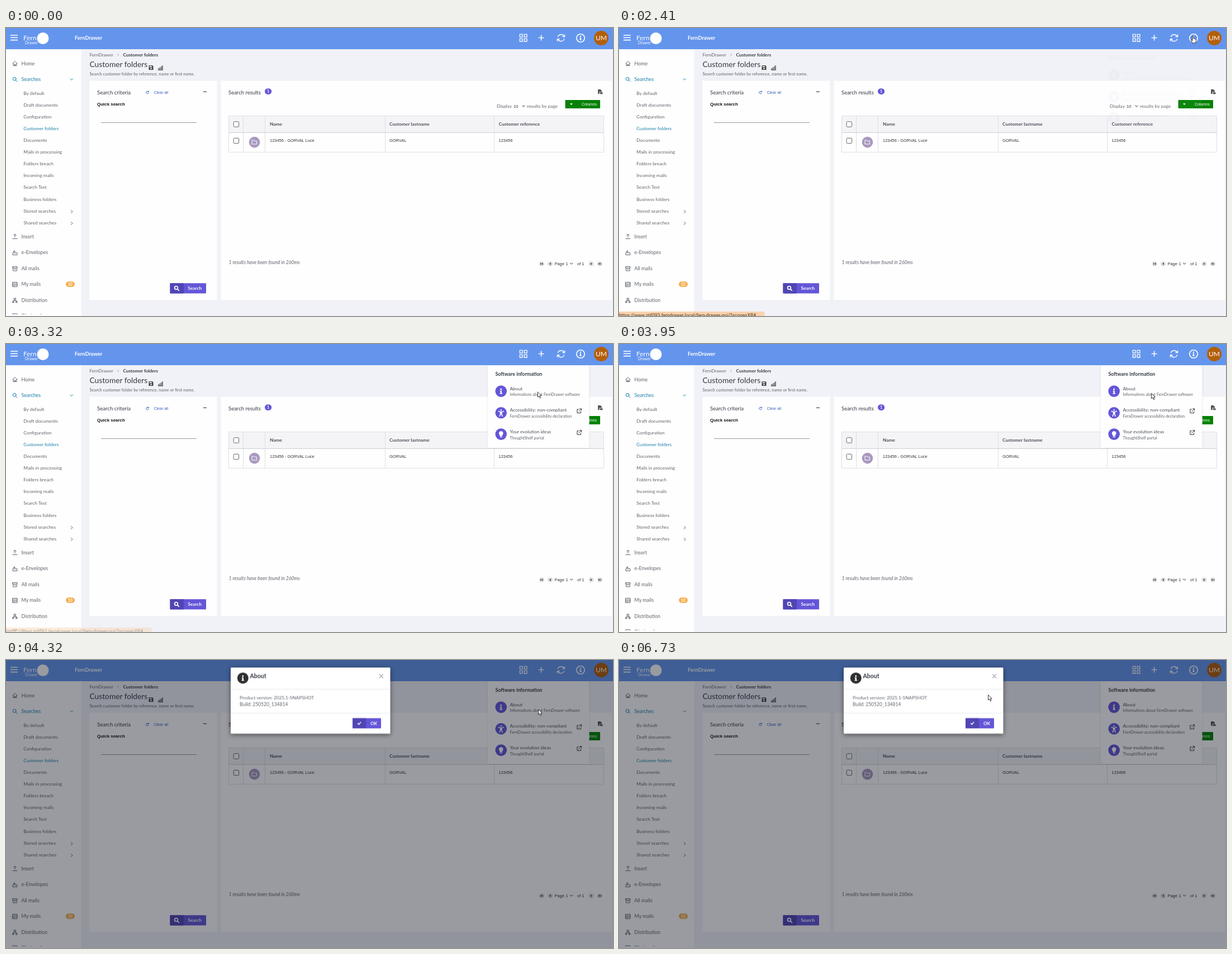
An HTML page that plays this animation: 1086x516 px, repeating every 8.05 s.

```html
<!DOCTYPE html>
<html lang="en">
<head>
<meta charset="utf-8">
<title>Customer folders</title>
<style>
  html, body { margin: 0; width: 100%; height: 100%; overflow: hidden; background: #f1f2f7; }
  svg { display: block; }
  text { font-family: Lato, "Open Sans", sans-serif; fill: #5f646c; white-space: pre; }
  .arial { font-family: "Liberation Sans", Arial, sans-serif; font-size: 7.45px; fill: #333; }
  .b { font-weight: 700; }
  .dark { fill: #343a44; }
  .white { fill: #fff; }
  .line { fill: none; stroke: #5f646c; stroke-width: 1; stroke-linecap: round; stroke-linejoin: round; }
  .bar { stroke: #fff; stroke-width: 1.6; }
  .on { fill: #1a7fa8; }
  .line.on { fill: none; stroke: #1a7fa8; }
  .main { font-size: 8.9px; }
  .sub { font-size: 8.35px; }
  .head { font-size: 8.4px; font-weight: 700; fill: #4a4f58; }
  .item { font-size: 8.3px; fill: #4a4f58; }
  .note { font-size: 7px; }
  .purple { fill: #6456d8; }
  .deep { fill: #5145b4; }

  .tip, .menu, .hover, .veil, .modal, .pointer, .arrow, .hand {
    animation: 8050ms linear infinite;
  }
  .tip { animation-name: tip; }
  .menu { animation-name: menu; filter: drop-shadow(0 0 1px rgba(50, 58, 70, .18)); }
  .hover { animation-name: hover; }
  .veil { animation-name: veil; }
  .modal { animation-name: modal; }
  .pointer { animation-name: pointer; }
  .arrow { animation-name: arrow; }
  .hand { animation-name: hand; }
  .sheet { filter: drop-shadow(0 2px 4px rgba(0, 0, 0, .5)); }

  @keyframes tip {
    0%, 19.5% { opacity: 0; }
    20.7%, 40% { opacity: 1; }
    42.2%, 100% { opacity: 0; }
  }
  @keyframes menu {
    0%, 29.9% { opacity: 0; }
    31.5%, 100% { opacity: 1; }
  }
  @keyframes hover {
    0%, 29.9% { opacity: 0; }
    31%, 38% { opacity: 1; }
    39.1%, 100% { opacity: 0; }
  }
  @keyframes veil {
    0%, 49.99% { opacity: 0; }
    50%, 100% { opacity: 1; }
  }
  @keyframes modal {
    0%, 49.99% { opacity: 0; transform: translateY(-24.5px); }
    50% { opacity: 1; transform: translateY(-24.5px); }
    50.8% { opacity: 1; transform: translateY(-24.5px); animation-timing-function: ease-out; }
    53.6%, 100% { opacity: 1; transform: none; }
  }
  @keyframes arrow {
    0%, 5.04% { opacity: 0; }
    5.05%, 16.1% { opacity: 1; }
    16.11%, 39% { opacity: 0; }
    39.01%, 100% { opacity: 1; }
  }
  @keyframes hand {
    0%, 16.1% { opacity: 0; }
    16.11%, 39% { opacity: 1; }
    39.01%, 100% { opacity: 0; }
  }
  @keyframes pointer {
    0%, 5.05% { transform: translate(912px, 143px); animation-timing-function: ease-out; }
    15%, 16.1% { transform: translate(1035px, 20px); }
    18.2% { transform: translate(1037px, 25.5px); }
    20.9%, 24.9% { transform: translate(1037px, 23px); }
    25.9%, 27.8% { transform: translate(1032px, 19px); }
    27.95%, 29.9% { transform: translate(1027px, 14px); }
    31% { transform: translate(1025px, 11px); }
    35.5% { transform: translate(1001.5px, 33.5px); }
    39.1% { transform: translate(952px, 86px); }
    42.2%, 44% { transform: translate(950px, 85px); }
    45.1%, 46.8% { transform: translate(949px, 84px); }
    48.9%, 57.6% { transform: translate(952px, 88px); animation-timing-function: ease-in; }
    61% { transform: translate(690px, 22px); }
    64.35% { transform: translate(439px, -5px); }
    67.2%, 68% { transform: translate(359px, 57px); }
    70.8% { transform: translate(470px, 146px); }
    73.6% { transform: translate(645px, 100px); }
    75.6%, 83.5% { transform: translate(661px, 62px); }
    83.6%, 100% { transform: translate(660px, 62px); }
  }
</style>
</head>
<body>
<svg width="1086" height="516" viewBox="0 0 1086 516">
  <defs>
    <g id="out" class="line" style="stroke:#333">
      <path d="M-1-3h-2.6v6.6h6.6V1M1-4h3v3M4-4L-.8.8"/>
    </g>
    <g id="drop" class="line" style="stroke:#222"><path d="M-2.2-1L0 1.2L2.2-1"/></g>
    <g id="lens" fill="none" stroke-linecap="round"><circle cx="-.8" cy="-.8" r="2.9"/><path d="M1.4 1.4L4 4"/></g>
    <g id="info"><circle cy="-3.5" r="1.5"/><path d="M-2-1H1.1V3.3H2.2V5H-2.2V3.3H-1.1V.6H-2z"/></g>
    <clipPath id="sideClip"><path d="M0 38H134V513H0z"/></clipPath>
  </defs>

  <rect width="1086" height="516" fill="#f1f2f7"/>

  <!-- sidebar -->
  <rect y="38" width="134.5" height="478" fill="#fefefe"/>
  <g id="side" clip-path="url(#sideClip)">
    <g class="line">
      <path d="M12 63.5L16 59.5L20 63.5M13 63V67.5H19V63M15 67.5V65H17V67.5"/>
      <use href="#lens" x="16" y="92" stroke="#1a7fa8"/>
      <path class="line on" d="M115 91L117.3 93.3L119.6 91"/>
      <path d="M116.5 326.5L119 329L116.5 331.5M116.5 347.5L119 350L116.5 352.5"/>
      <path d="M16 375V369.5M13.8 371.5L16 369.2L18.2 371.5M12 377.5H20"/>
      <path d="M14 401L12 403V406.5H20V403L18 402M14 403H18M15 399V402M13.5 400.5L15 399L16.5 400.5"/>
      <path d="M12 427.5H20V430H12zM12.7 430V435H19.3V430M14.8 432H17.2"/>
      <path d="M12 455.5H20V463.5H12zM12 458H20M12 460.5H20M14 462H15"/>
      <path d="M14.5 484H17.5V486.5H14.5zM16 486.5V488.5M13 490V488.5H19V490M12 490H14V492H12zM18 490H20V492H18z"/>
      <path d="M12 512H20V517H12z"/>
    </g>
    <rect x="107" y="454.3" width="16" height="9.6" rx="4.8" fill="#f3b04f"/>
    <text x="110.8" y="461.6" class="white b" style="font-size:7px">10</text>
  </g>

  <!-- top bar -->
  <rect width="1086" height="38" fill="#6495ed"/>
  <rect class="hover" x="1012" width="31.5" height="38" fill="#6c93dc"/>
  <path class="bar" stroke-width="2" d="M8 13H21M8 17.3H21M8 21.6H21"/>
  <circle cx="66" cy="18.5" r="10.5" fill="#fff"/>
  <text x="31" y="21.5" class="white" style="font-size:12px">Fern</text>
  <text x="34" y="28.5" class="white" style="font-size:7px">Drawer</text>
  <text x="123" y="21.2" class="white b" style="font-size:9.3px">FernDrawer</text>
  <g class="bar" fill="none">
    <path stroke-width="1.3" d="M919.3 11.4H924V16.2H919.3zM927.2 11.4H932V16.2H927.2zM919.3 19.2H924V24H919.3zM927.2 19.2H932V24H927.2z"/>
    <path d="M952.7 17.5H962.5M957.6 12.6V22.4"/>
    <path stroke-width="1.4" d="M987.3 16A6 6 0 0 1 998.3 14.8M999.5 11.5V15.6H995.4M998.8 19.4A6 6 0 0 1 987.8 20.6M986.5 24V19.8H990.6"/>
    <circle cx="1028" cy="18" r="7.2"/>
  </g>
  <use href="#info" transform="translate(1028 17.7) scale(.82)" fill="#fff"/>
  <circle cx="1065" cy="18" r="13" fill="#b35f0a"/>
  <text x="1065" y="22.2" text-anchor="middle" class="white" style="font-size:12px">UM</text>

  <!-- page heading -->
  <text x="149.5" y="50.6" style="font-size:8.1px">FernDrawer</text>
  <path class="line" style="stroke:#aaa" d="M199.7 46L201.6 48L199.7 50"/>
  <text x="209.5" y="50.8" class="b dark" style="font-size:8.2px">Customer folders</text>
  <text x="149.5" y="70" class="dark" style="font-size:13.75px">Customer folders</text>
  <path fill="#444" fill-rule="evenodd" d="M255.5 67H262L263.5 68.5V75H255.5zM256.8 68.2H261V70.3H256.8zM259.5 71.2a1.4 1.4 0 1 0 .01 0z"/>
  <path d="M272 75H281M273 74V72M275.4 74V70.5M277.8 74V69M280 74V67" stroke="#555" stroke-width="1.5"/>
  <text x="149.5" y="84.6" style="font-size:7.6px">Search customer folder by reference, name or first name.</text>

  <!-- criteria -->
  <rect x="149.5" y="94.5" width="228" height="392.5" fill="#fefefe"/>
  <text x="163" y="118.5" class="dark" style="font-size:9.6px">Search criteria</text>
  <path class="line" style="stroke:#3a63c4" d="M255 114.3A2.3 2.3 0 1 0 255.2 116.4M255.3 112.8V114.4H253.7"/>
  <text x="264.5" y="118" class="arial" style="font-size:7px;fill:#3a63c4">Clear all</text>
  <path d="M352.7 114.2H359" stroke="#333" stroke-width="1.1"/>
  <text x="163" y="139" class="arial b" style="font-size:7.95px;fill:#111">Quick search</text>
  <path d="M170 169.5H341" stroke="#999"/>
  <rect x="293.5" y="457.3" width="64.5" height="18.2" rx="1" class="purple"/>
  <rect x="293.5" y="457.3" width="24.5" height="18.2" rx="1" class="deep"/>
  <use href="#lens" x="305.3" y="466.3" stroke="#fff" stroke-width="1.7"/>
  <text x="325.5" y="469.3" class="white b" style="font-size:8.2px">Search</text>

  <!-- results -->
  <rect x="384.5" y="94.5" width="699.5" height="392.5" fill="#fefefe"/>
  <text x="398" y="118.5" class="dark" style="font-size:9.5px">Search results</text>
  <rect x="463" y="108.3" width="12.2" height="10.6" rx="5.3" class="purple"/>
  <text x="469.1" y="116.2" text-anchor="middle" class="white b" style="font-size:7px">1</text>
  <path fill="#555" d="M1059 110H1063.5L1066 112.5V114.5H1061.5V118H1059zM1062.5 115.3H1067.5V118.3H1062.5z"/>
  <text x="878" y="143" style="font-size:8.4px">Display</text>
  <text x="908" y="143" class="arial">10</text>
  <use href="#drop" x="926" y="140"/>
  <text x="932" y="143" style="font-size:8.45px">results by page</text>
  <rect x="1000.5" y="129" width="62.5" height="15" rx="1" fill="#058205"/>
  <path d="M1008.8 135.2H1014L1011.4 138z" fill="#fff"/>
  <text x="1030" y="139" class="arial" style="font-size:6.85px;fill:#fff">Columns</text>

  <rect x="398.5" y="157.5" width="671" height="29.5" fill="#f4f4f7"/>
  <path d="M398.5 157.5H1069.5V222.5H398.5zM424.5 157.5V222.5M463.5 157.5V222.5M678.5 157.5V222.5M873.5 157.5V222.5" fill="none" stroke="#dedfe4"/>
  <path d="M398.5 187.3H1069.5" stroke="#d3d5db" stroke-width="1.2"/>
  <g fill="#fff" stroke="#666">
    <rect x="407.2" y="167.8" width="9.4" height="9.4" rx="1.5"/>
    <rect x="407.2" y="197.3" width="9.4" height="9.4" rx="1.5"/>
  </g>
  <circle cx="444.5" cy="204.6" r="9.8" fill="#a999bf"/>
  <path class="line" style="stroke:#fff" d="M440.4 201.3H443.5L444.7 202.6H448.6V208H440.4z"/>
  <text x="472" y="174.8" class="head">Name</text>
  <text x="686" y="174.8" class="head">Customer lastname</text>
  <text x="881.5" y="174.8" class="head">Customer reference</text>
  <text x="472" y="204" class="arial">123456 - GORVAL Luce</text>
  <text x="686" y="204" class="arial">GORVAL</text>
  <text x="881.5" y="204" class="arial">123456</text>

  <text x="398.5" y="422.8" font-style="italic" style="font-size:8.65px">1 results have been found in 260ms</text>
  <g fill="#e0e0e3">
    <circle cx="958.3" cy="422.5" r="4.6"/><circle cx="973.6" cy="422.5" r="4.6"/>
    <circle cx="1047" cy="422.5" r="4.6"/><circle cx="1062.4" cy="422.5" r="4.6"/>
  </g>
  <path fill="#555" d="M956 420.5h1v4h-1zM960.5 420.3V424.7L957.2 422.5zM975 420.3V424.7L971.7 422.5zM1045.7 420.3V424.7L1049 422.5zM1060.2 420.3V424.7L1063.5 422.5zM1063.7 420.5h1v4h-1z"/>
  <text x="981.5" y="425" class="arial">Page</text>
  <text x="1001.5" y="425" class="arial">1</text>
  <use href="#drop" x="1011.6" y="422"/>
  <text x="1022" y="425" class="arial">of 1</text>

  <!-- link preview -->
  <g class="tip">
    <path d="M0 508H257Q260.5 508 260.5 511.5V516H0z" fill="#fad2ab"/>
    <text x="0" y="518" style="font:8.4px Roboto,sans-serif;fill:#4b3c30">https://www.zt4093.ferndrawer.local/fern-drawer-gui/?scope=XR#</text>
  </g>

  <!-- information menu -->
  <g class="menu">
    <rect x="861.5" y="38" width="182" height="148" fill="#fefefe"/>
    <text x="875.5" y="56.7" class="b dark" style="font-size:8.85px">Software information</text>
    <g class="purple">
      <circle cx="885.7" cy="84.6" r="10.3"/><circle cx="885.7" cy="123.2" r="10.3"/><circle cx="885.7" cy="161.6" r="10.3"/>
    </g>
    <use href="#info" x="885.7" y="84.4" fill="#fff"/>
    <g class="bar" fill="none" stroke-linecap="round">
      <circle cx="885.7" cy="118.3" r=".6"/>
      <path d="M881.3 120.6L884.3 121.8H887.1L890.1 120.6M885.7 122V125M884.7 122V125.5L883.3 129.3M886.7 122V125.5L888.1 129.3"/>
    </g>
    <path d="M885.7 156a4 4 0 0 1 2.3 7.2V165H883.4V163.2A4 4 0 0 1 885.7 156zM883.8 165.8H887.6V167.3H883.8z" fill="#fff"/>
    <text x="901.5" y="82.5" class="item">About</text>
    <text x="901.5" y="93.2" class="note">Informations about FernDrawer software</text>
    <text x="901.5" y="121.4" class="item">Accessibility: non-compliant</text>
    <text x="901.5" y="132" class="note">FernDrawer accessibility declaration</text>
    <text x="901.5" y="160.2" class="item">Your evolution ideas</text>
    <text x="901.5" y="170.8" class="note">ThoughtShelf portal</text>
    <use href="#out" x="1025.5" y="120"/>
    <use href="#out" x="1025.5" y="158.7"/>
  </g>

  <!-- about dialog -->
  <rect class="veil" width="1086" height="516" fill="#0c121e" fill-opacity=".42"/>
  <g class="modal">
    <rect class="sheet" x="402" y="13.5" width="285.5" height="118.5" rx="1.5" fill="#fff"/>
    <circle cx="423.8" cy="32.4" r="10" fill="#2f2f2f"/>
    <use href="#info" x="423.8" y="32.3" fill="#fff"/>
    <text x="436.5" y="32" class="b dark" style="font-size:10.5px">About</text>
    <path class="line" d="M668.3 25.8L674.7 32.2M674.7 25.8L668.3 32.2"/>
    <path d="M402 52.5H687.5M402 95.3H687.5" stroke="#e6e8ec"/>
    <text x="418" y="70.6" style="font-size:8.25px">Product version: 2025.1-SNAPSHOT</text>
    <text x="418" y="82.6" style="font-size:8.5px">Build: 250520_134814</text>
    <rect x="620" y="104.3" width="51" height="18.2" rx="1" class="purple"/>
    <rect x="620" y="104.3" width="24.3" height="18.2" rx="1" class="deep"/>
    <path class="bar" fill="none" d="M629.2 113.3L631.2 115.3L635 111.2"/>
    <text x="652" y="116.3" class="white b" style="font-size:8.2px">OK</text>
  </g>

  <g class="pointer" stroke="#222" stroke-width=".9" stroke-linejoin="round" fill="#fff">
    <path class="arrow" d="M.5.5V9.8L2.7 7.8L4.4 11.6L6 10.9L4.3 7.3H7.3z"/>
    <path class="hand" d="M-1 1Q0-.5 1 1V5Q2.3 4.3 2.8 5.5Q4 5 4.3 6.2Q5.5 6 5.5 7.5V10L4.6 13H-.8L-3.5 8.8Q-3.6 7.4-2.2 7.7L-1 9z"/>
  </g>
</svg>
<script>
  const side = document.getElementById("side");
  const label = (x, y, kind, text) => {
    const el = document.createElementNS("http://www.w3.org/2000/svg", "text");
    el.setAttribute("x", x);
    el.setAttribute("y", y);
    el.setAttribute("class", kind);
    el.textContent = text;
    side.append(el);
  };

  label(27.5, 66.5, "main", "Home");
  label(27.5, 95, "main on", "Searches");
  ["By default", "Draft documents", "Configuration", "Customer folders", "Documents",
   "Mails in processing", "Folders breach", "Incoming mails", "Search Test",
   "Business folders", "Stored searches", "Shared searches"].forEach((text, i) =>
    label(31.3, 119.5 + i * 21.12, i === 3 ? "sub on" : "sub", text));
  ["Insert", "e-Envelopes", "All mails", "My mails", "Distribution", "Filed mails"].forEach((text, i) =>
    label(27.5, 377 + i * 28.4, "main", text));
</script>
</body>
</html>
```
